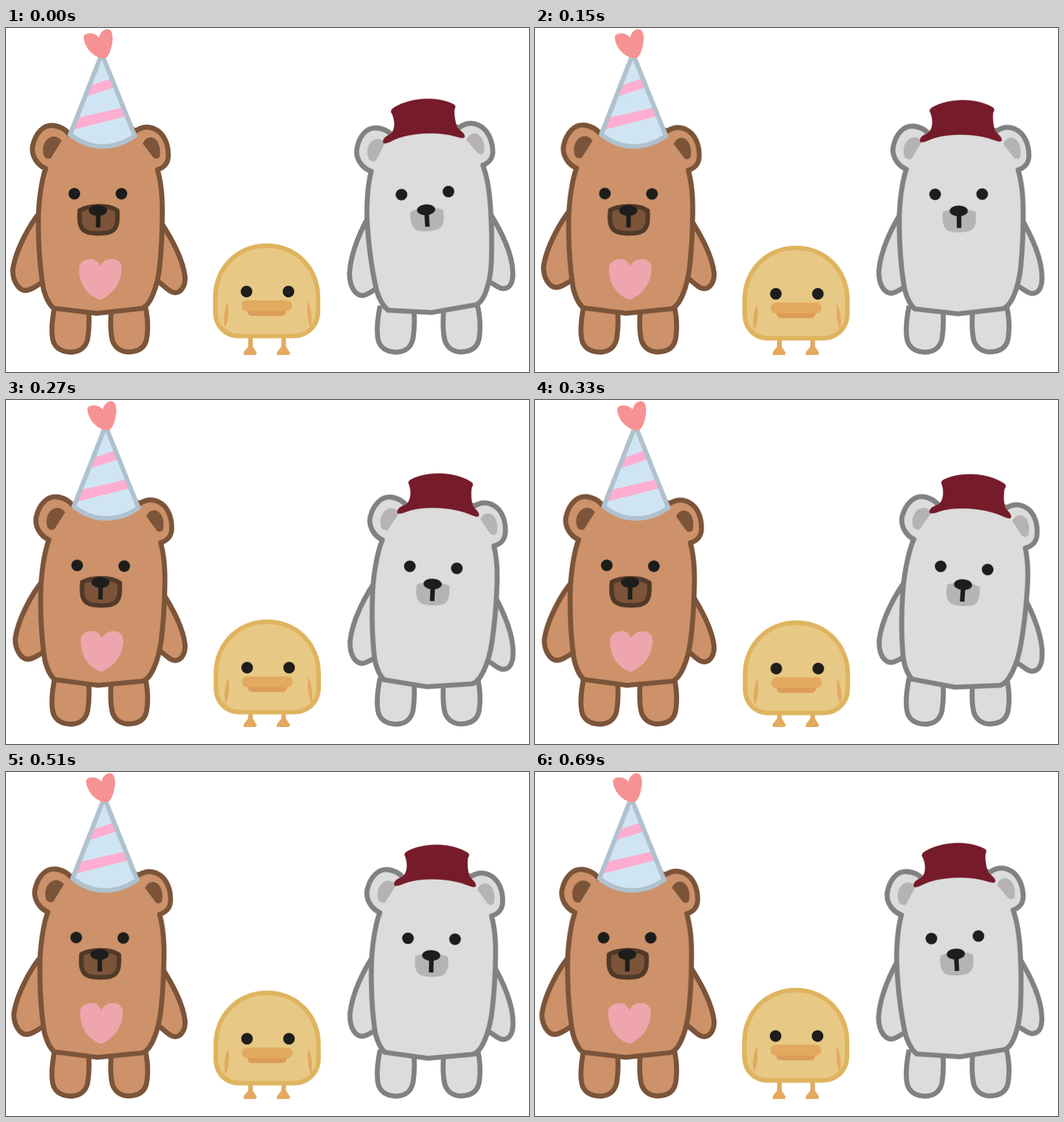
An HTML page without scripts for the animation above (720 ms loop, 922 by 607 pixels).

```html
<!DOCTYPE html>
<html lang="en">
<head>
<meta charset="utf-8">
<title>Swaying friends</title>
<style>
  html, body { margin: 0; width: 100%; height: 100%; overflow: hidden; background: #fff; }
  svg { display: block; width: 922px; height: 607px; }

  .brown { fill: #cd926a; stroke: #7b5439; }
  .white { fill: #dcdcdc; stroke: #818181; }
  .brown, .white { stroke-width: 8.8; stroke-linejoin: round; }
  .plain { stroke: none; }
  .ink { fill: #1d1d1b; stroke: none; }
  .beak { fill: #e3a95e; }

  /* Each part moves from its own transform to --to and back. */
  .sway, .lean, .lift { animation: sway 720ms steps(12) infinite; }
  .lean { animation-name: lean; }
  .lift { animation-name: lift; }
  @keyframes sway { 50% { transform: var(--to); } }
  @keyframes lean {
    0% { animation-timing-function: steps(11); }
    45.8333% { transform: var(--to); animation-timing-function: steps(13); }
  }
  @keyframes lift {
    0% { animation-timing-function: steps(7); }
    29.1667% { transform: var(--to); animation-timing-function: steps(8); }
    62.5%, 100% { transform: none; }
  }

  .brown-body { transform-origin: 162px 614px; --to: rotate(1.08deg); }
  .brown-arm { --to: translate(3.5px, 0); }
  .brown-arm path { --to: translate(2px, -7.5px); }
  .brown-arm-right { --to: translate(0, -9.8px); }
  .party-hat { --to: translate(8px, 0); }
  .duck { --to: translate(1.5px, 9.6px); }
  .white-body { transform-origin: 710px 428px; transform: rotate(-3.75deg); --to: rotate(4.6deg); }
  .white-arm-left, .white-arm-right { transform: translate(0, 0) rotate(0deg); }
  .white-arm-left { transform-origin: 620px 450px; --to: translate(0, -10.5px) rotate(5deg); }
  .white-arm-right { transform-origin: 878px 440px; --to: translate(0, 20.5px) rotate(4deg); }
</style>
</head>
<body>
<svg viewBox="0 0 922 607" xmlns="http://www.w3.org/2000/svg">
  <defs>
    <path id="leg-left" d="M86 490C81 515 79 540 84 555C90 568 103 572 116 572C131 571 141 563 144 548C147 530 147 510 145 490"/>
    <path id="leg-right" d="M186 490C184 515 183 540 189 555C195 567 206 572 217 571.500C233 571 245 565 248 548C251 530 250 505 244 486"/>
    <path id="torso" d="M112 188C105 179 95 173 82 172C66 171 52 185 47 208C44 225 55 242 70 248
      C62 270 57 310 57 340C57 385 60 425 66 460C70 475 75 487 84 494.500L160 503.500L238 495
      C254 492 267 457 271 420C274 390 275.500 360 275.500 330C276 300 273 270 267 250
      C277 247 285 240 286 228C287 208 280 186 262 178C252 173 240 174 230 181Q170 165 112 188Z"/>
    <path id="inner-ears" d="M98 199C90 189 80 190 73 196C66 203 63 213 67 226C70 231 75 231 79 230Z
      M241 204C246 193 255 190 263 196C271 203 273 215 271 227C268 232 263 231 260 229Z"/>
    <g id="face">
      <circle cx="120.500" cy="292.500" r="10.300"/>
      <circle cx="203.500" cy="292.500" r="10.300"/>
      <ellipse cx="162" cy="322" rx="16" ry="9.500"/>
      <path d="M158.500 325h8v27h-8z"/>
    </g>
    <path id="foot" class="beak" d="M427 540h8v22l7 11v1l-2 3h-21v-5l8-10z"/>
  </defs>

  <g class="brown">
    <g class="brown-arm lean">
      <path class="lift" d="M62 323C42 345 17 392 12 426C11 445 22 463 34 463C45 463 58 452 70 445L80 380Z"/>
    </g>
    <path class="brown-arm-right lift" d="M272 341C293 373 312 410 315.500 438C317 456 308 467 298 467C288 467 280 455 265 445L250 380Z"/>
    <use href="#leg-left"/>
    <use href="#leg-right"/>
    <g class="brown-body lean">
      <use href="#torso"/>
      <use href="#inner-ears" class="plain" fill="#7b5439"/>
      <path fill="#7b5439" stroke="#503927" stroke-width="8" d="M130 322C145 313 180 311 196 322C197 338 197 352 187 358C178 364 148 364 139 358C129 352 129 338 130 322Z"/>
      <use href="#face" class="ink"/>
      <path class="plain" fill="#eea5ae" d="M166 420C162 412 156 407 148 408C136 409 127 415 129 429C130 455 147 472 160 477C165 480 168 480 173 476C190 467 203 450 204 424C203 410 192 406 183 408C174 408 169 415 166 420Z"/>
    </g>
  </g>

  <g class="party-hat lean">
    <path fill="#cfe5f3" d="M166 53L113 188Q140 209 170 209Q201 209 227 190L172 53Z"/>
    <path fill="#ffadd0" d="M151 101L183 90L190 105L144 120ZM129 158L203 141L210 156L120 179Z"/>
    <path fill="none" stroke="#b0c1ce" stroke-width="8" d="M166 53L113 188Q140 209 170 209Q201 209 227 190L172 53Z"/>
    <path fill="#f69293" d="M168 53C152 50 137 32 137 16C137 10 148 8 156 11C160 12 163 16 164 17C166 8 172 2 179 2C187 3 188 12 188 20C187 32 184 44 178 51C175 54 171 54 168 53Z"/>
  </g>

  <use href="#foot"/>
  <use href="#foot" x="58.500"/>
  <g class="duck sway">
    <path fill="#e7c985" stroke="#dfb45f" stroke-width="8" d="M369 475C369 424 408 384 459.500 384C511 384 550 424 550 475V500C550 525 532 543.500 505 543.500H412C385 543.500 369 525 369 500Z"/>
    <path class="beak" d="M391 484C385 493 382 512 386 528C391 520 394 505 391 484ZM532 482C530 495 531 515 537 527C541 515 538 495 532 482Z"/>
    <circle class="ink" cx="424" cy="465" r="10.300"/>
    <circle class="ink" cx="498" cy="465" r="10.300"/>
    <path fill="#dc9c57" d="M425 496H494V500Q493 508 485 508H434Q426 508 425 500Z"/>
    <rect class="beak" x="415" y="480.500" width="89.500" height="19" rx="9"/>
  </g>

  <g class="white">
    <path class="white-arm-left sway" d="M652 312C624 354 607 400 605.500 434C606 460 618 473 630 472C640 470 648 462 660 455L670 380Z"/>
    <path class="white-arm-right sway" d="M847 317C875 360 893 400 893.500 432C894 450 888 460 876 460C867 459 862 452 850 447L840 380Z"/>
    <use href="#leg-left" x="573.500"/>
    <use href="#leg-right" x="586"/>
    <g class="white-body sway">
      <g transform="translate(585.500 1)">
        <use href="#torso"/>
        <g class="plain" fill="#b5b4b2">
          <use href="#inner-ears"/>
          <path d="M134 324C148 317 176 317 192 324C193 340 192 351 184 356C175 361 150 361 142 356C133 350 133 338 134 324Z"/>
        </g>
        <use href="#face" class="ink"/>
      </g>
      <path class="plain" fill="#751b29" d="M680 201C678 193 685 189 692 186C703 181 704 160 697 147C697 142 700 141 705 138C735 123 780 124 806 139C812 142 812 145 809 150C808 160 809 172 812 181C816 188 825 192 824 199C822 202 818 201 812 199C780 186 725 184 693 199C688 201 684 202 680 201Z"/>
    </g>
  </g>
</svg>
</body>
</html>
```
